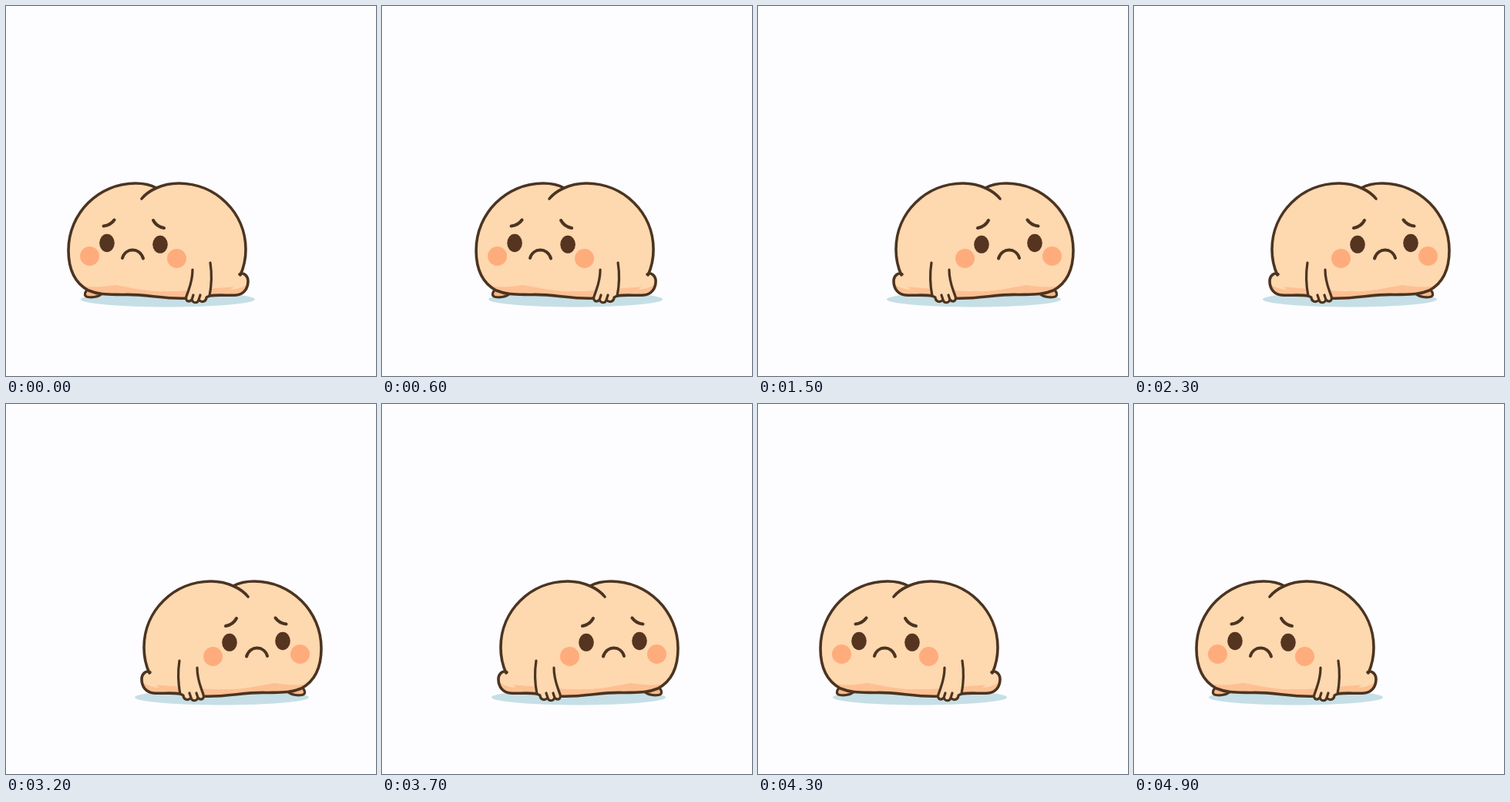
An HTML page that plays this animation: 480x480 px, repeating every 5000 ms.

```html
<!DOCTYPE html>
<html lang="en">
<head>
<meta charset="utf-8">
<title>Sad peach</title>
<style>
html, body { margin: 0; width: 100%; height: 100%; overflow: hidden; background: #fdfdff; }
svg { display: block; width: 100vw; height: 100vh; }
.line { fill: none; stroke: #4b3421; stroke-width: 3.6; stroke-linecap: round; stroke-linejoin: round; }
.face { stroke-width: 4; }
.thin { stroke-width: 3.2; }
.skin { fill: #fed8af; }
.shade { fill: #fdc093; }
.foot { fill: #fbb884; }
.cheek { fill: #ffac7c; }
.eye { fill: #553420; }
.shadow { fill: #c6dfe7; }
</style>
</head>
<body>
<svg viewBox="0 0 480 480">
  <defs>
    <path id="bodyShape" d="M195 236C186 231 177 230 168 230C120 230 81 269 81 317C81 345 92 361 107 369C121 375 136 374 152 374.500C178 373 207 381 236 379L264 376.500C283 375 298 369 304 349C309 338 311 326 311 316C311 268 272 230 224 230C212 230 202 233 195 236Z"/>
    <path id="tailShape" d="M303 348C308 345 314 350 314 357C314 367 308 374 299 375C288 376 275 374 258 376L258 350Z"/>
    <clipPath id="bodyClip"><use href="#bodyShape"/></clipPath>
  </defs>
  <g id="peach">
    <ellipse id="shadow" class="shadow" cy="380.5" ry="10"/>
    <path class="foot line thin" d="M109 366C102 369 100 377 106 377.500C113 378.500 120 377 125 373" style="fill:#fbb884"/>
    <g id="tail">
      <use href="#tailShape" class="skin"/>
      <path class="shade" d="M262 370C282 367 299 371 313 361C311 371 305 375 296 375L262 376Z"/>
    </g>
    <use href="#bodyShape" class="skin"/>
    <path class="shade" clip-path="url(#bodyClip)" d="M88 358C104 367 121 365 142 362C166 366 184 371 207 370C230 371 255 367 303 364V385H88Z"/>
    <path class="line" d="M195 236C186 231 177 230 168 230C120 230 81 269 81 317C81 345 92 361 107 369C121 375 136 374 152 374.500C178 373 207 381 236 379"/>
    <path class="line" d="M176 250C184 240 202 230 224 230C272 230 311 268 311 316C311 326 309 338 304 349"/>
    <path id="tailLine" class="line" d="M303 348C308 345 314 350 314 357C314 367 308 374 299 375C288 376 277 374 264 376"/>
    <path id="roundLine" class="line" d="M304 349C298 367 285 375 264 376"/>
    <path class="skin" d="M242 342C242 357 237 365 235 374C231 383 237 385 241 381C243 386 249 386 250 381C254 386 260 383 260 379L264 375C267 361 267 346 265 333Z"/>
    <path class="line thin" d="M242 342C242 357 238 365 235 374C231 383 237 385 241 381C243 386 249 386 250 381C254 386 260 383 260 378L264 376C267 361 267 346 265 333M243 375L241 381M252 375L250 381"/>
    <g id="cheeks" class="cheek">
      <circle cx="108.500" cy="324.500" r="12.500"/>
      <circle cx="221.500" cy="327.500" r="12.500"/>
    </g>
    <g id="awake">
      <ellipse class="eye" cx="131" cy="307.500" rx="9.800" ry="11.800"/>
      <ellipse class="eye" cx="200" cy="309.300" rx="9.800" ry="11.500"/>
      <path class="line face" d="M126.500 285.500Q135.500 284.500 140.500 277.500M191 278Q195 286 205 288M151 327C155 313.500 173 312.500 178 327.500"/>
    </g>
    <g id="asleep">
      <path class="line face" d="M129 291Q139 290 143 285M192 286Q197 292.500 207 293M122 311C130 307 139 310 143 317.500M192 317.500C196 310 206 307 214 312M150 328.500C156 319.500 174 318.500 182 328.500"/>
    </g>
  </g>
</svg>
<script>
const LOOP = 5000, STEP = 100;
const TURN = 1500, RETURN = 4200;
const SHUT = [800, 1200];
// [time, horizontal offset from the left resting place]
const slide = [[0, 0], [100, 0], [1000, 74], [1300, 100], [3300, 100], [3600, 81], [3700, 75], [4200, 30]];
const el = id => document.getElementById(id);
const show = (id, on) => el(id).setAttribute('visibility', on ? 'visible' : 'hidden');

function offset(t) {
  if (t >= RETURN) return 0;
  const i = slide.findIndex(k => k[0] > t);
  const [t0, x0] = slide[i - 1], [t1, x1] = slide[i];
  return x0 + (x1 - x0) * (t - t0) / (t1 - t0);
}

function draw(t) {
  const x = offset(t);
  const flipped = t >= TURN && t < RETURN;
  const shut = t >= SHUT[0] && t <= SHUT[1];
  el('peach').setAttribute('transform', flipped ? `translate(${390 + x} 0) scale(-1 1)` : `translate(${x} 0)`);
  for (const id of ['awake', 'tail', 'tailLine']) show(id, !shut);
  for (const id of ['asleep', 'roundLine']) show(id, shut);
  el('cheeks').setAttribute('transform', shut ? 'translate(1.5 3.5)' : '');
  el('shadow').setAttribute('cx', shut ? 199.5 : 210);
  el('shadow').setAttribute('rx', shut ? 108.5 : 113);
}

const start = performance.now();
function tick() {
  const t = (performance.now() - start) % LOOP;
  draw(Math.floor(t / STEP) * STEP);
  requestAnimationFrame(tick);
}
draw(0);
requestAnimationFrame(tick);
</script>
</body>
</html>
```
